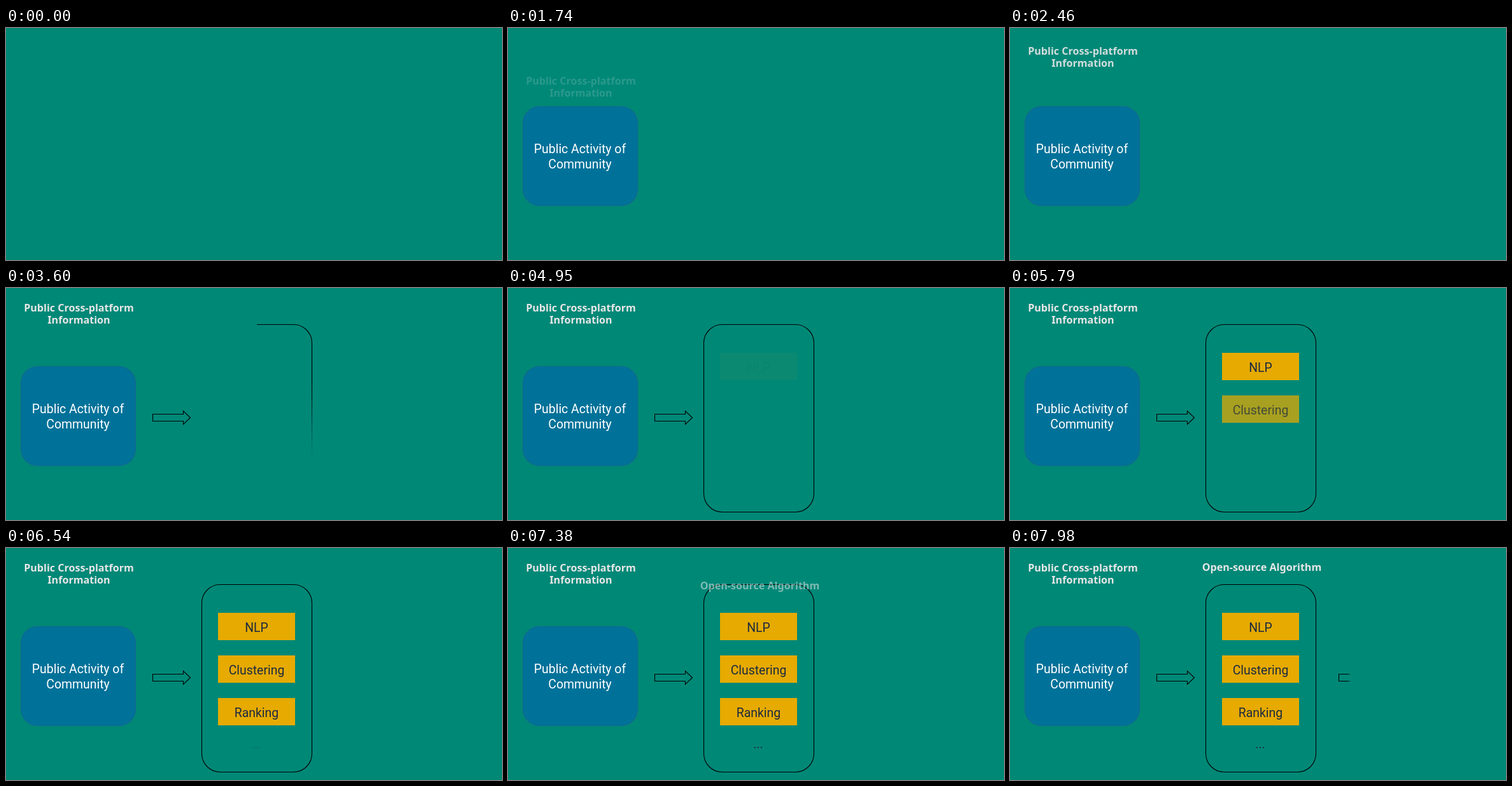
Recreate the animation shown at these times as an HTML page with a canvas. Size 779 by 365 pixels, loop 8 s.

```html
<!DOCTYPE html>
<html lang="en">
<head>
<meta charset="utf-8">
<title>Community pipeline</title>
<style>
  html, body { margin: 0; width: 100%; height: 100%; overflow: hidden; background: #008877; }
  canvas { display: block; }
</style>
</head>
<body>
<canvas id="stage" width="779" height="365"></canvas>
<script>
const W = 779, H = 365, LOOP = 8000;
const TITLE = 'bold 16.1px "Noto Sans", "Open Sans", sans-serif';
const BODY = '19.4px Roboto, "Open Sans", sans-serif';
const INK = '#1c2a40';

const canvas = document.getElementById('stage');
const ctx = canvas.getContext('2d');
const ratio = window.devicePixelRatio || 1;
canvas.width = W * ratio;
canvas.height = H * ratio;
canvas.style.width = W + 'px';
canvas.style.height = H + 'px';

const progress = (t, start, end) => Math.min(1, Math.max(0, (t - start) / (end - start)));

function write(lines, x, y, leading, font, color) {
  ctx.font = font;
  ctx.fillStyle = color;
  ctx.textAlign = 'center';
  lines.forEach((line, i) => ctx.fillText(line, x, y + i * leading));
}

function roundRect(x, y, w, h, r) {
  ctx.beginPath();
  ctx.roundRect(x, y, w, h, r);
}

// Heading drifts upwards while it fades in.
function heading(lines, x, y, p) {
  if (!p) return;
  ctx.globalAlpha = p;
  write(lines, x, y + 64.7 * (1 - p), 19, TITLE, '#e7e6e6');
  ctx.globalAlpha = 1;
}

function community(p) {
  if (!p) return;
  ctx.globalAlpha = p;
  roundRect(23.5, 123.5, 180, 156, 26);
  ctx.fillStyle = '#007299';
  ctx.fill();
  ctx.strokeStyle = '#14668f';
  ctx.stroke();
  write(['Public Activity of', 'Community'], 113, 197, 24, BODY, '#fff');
  ctx.globalAlpha = 1;
}

// Arrow is wiped in from the left with a soft edge.
function arrow(x, p) {
  if (!p) return;
  const feather = 6, front = x + p * (60 + feather);
  const fade = ctx.createLinearGradient(front - feather, 0, front, 0);
  fade.addColorStop(0, '#000');
  fade.addColorStop(1, 'rgba(0,0,0,0)');
  ctx.strokeStyle = fade;
  ctx.beginPath();
  ctx.moveTo(x + .5, 198.5);
  ctx.lineTo(x + 48.5, 198.5);
  ctx.lineTo(x + 48.5, 193.5);
  ctx.lineTo(x + 59.5, 204);
  ctx.lineTo(x + 48.5, 214.5);
  ctx.lineTo(x + 48.5, 209.5);
  ctx.lineTo(x + .5, 209.5);
  ctx.closePath();
  ctx.stroke();
}

// Frame is swept in clockwise from the top with a soft edge.
function frame(p) {
  if (!p) return;
  if (p < 1) {
    const feather = 70, lead = p * (360 + feather), tail = lead - feather;
    const alphaAt = a => Math.min(1, Math.max(0, (lead - a) / feather));
    const sweep = ctx.createConicGradient(-Math.PI / 2, 394, 205);
    for (const a of [0, tail, lead, 360]) {
      if (a >= 0 && a <= 360) sweep.addColorStop(a / 360, `rgba(0,0,0,${alphaAt(a)})`);
    }
    ctx.strokeStyle = sweep;
  } else {
    ctx.strokeStyle = '#000';
  }
  roundRect(307.5, 57.5, 173, 295, 29);
  ctx.stroke();
}

function step(label, y, p) {
  if (!p) return;
  ctx.globalAlpha = p;
  ctx.fillStyle = '#e6aa00';
  ctx.fillRect(333, y, 121, 43);
  write([label], 393.5, y + 30, 0, BODY, INK);
  ctx.globalAlpha = 1;
}

function more(p) {
  ctx.globalAlpha = p;
  write(['...'], 393, 314.5, 0, BODY, INK);
  ctx.globalAlpha = 1;
}

function draw(t) {
  ctx.setTransform(ratio, 0, 0, ratio, 0, 0);
  ctx.fillStyle = '#008877';
  ctx.fillRect(0, 0, W, H);
  ctx.lineWidth = 1.1;

  community(progress(t, 1150, 1550));
  heading(['Public Cross-platform', 'Information'], 114.5, 36.5, progress(t, 1550, 2550));
  arrow(230, progress(t, 2548, 3048));
  frame(progress(t, 3035, 4945));
  ['NLP', 'Clustering', 'Ranking'].forEach((label, i) => {
    const start = 4925 + i * 500;
    step(label, 102 + i * 67, progress(t, start, start + 500));
  });
  more(progress(t, 6425, 6835));
  heading(['Open-source Algorithm'], 395.5, 36, progress(t, 6835, 7835));
  arrow(516, progress(t, 7829, 8329));
}

const origin = performance.now();
function tick() {
  draw((performance.now() - origin) % LOOP);
  requestAnimationFrame(tick);
}
tick();
</script>
</body>
</html>
```
